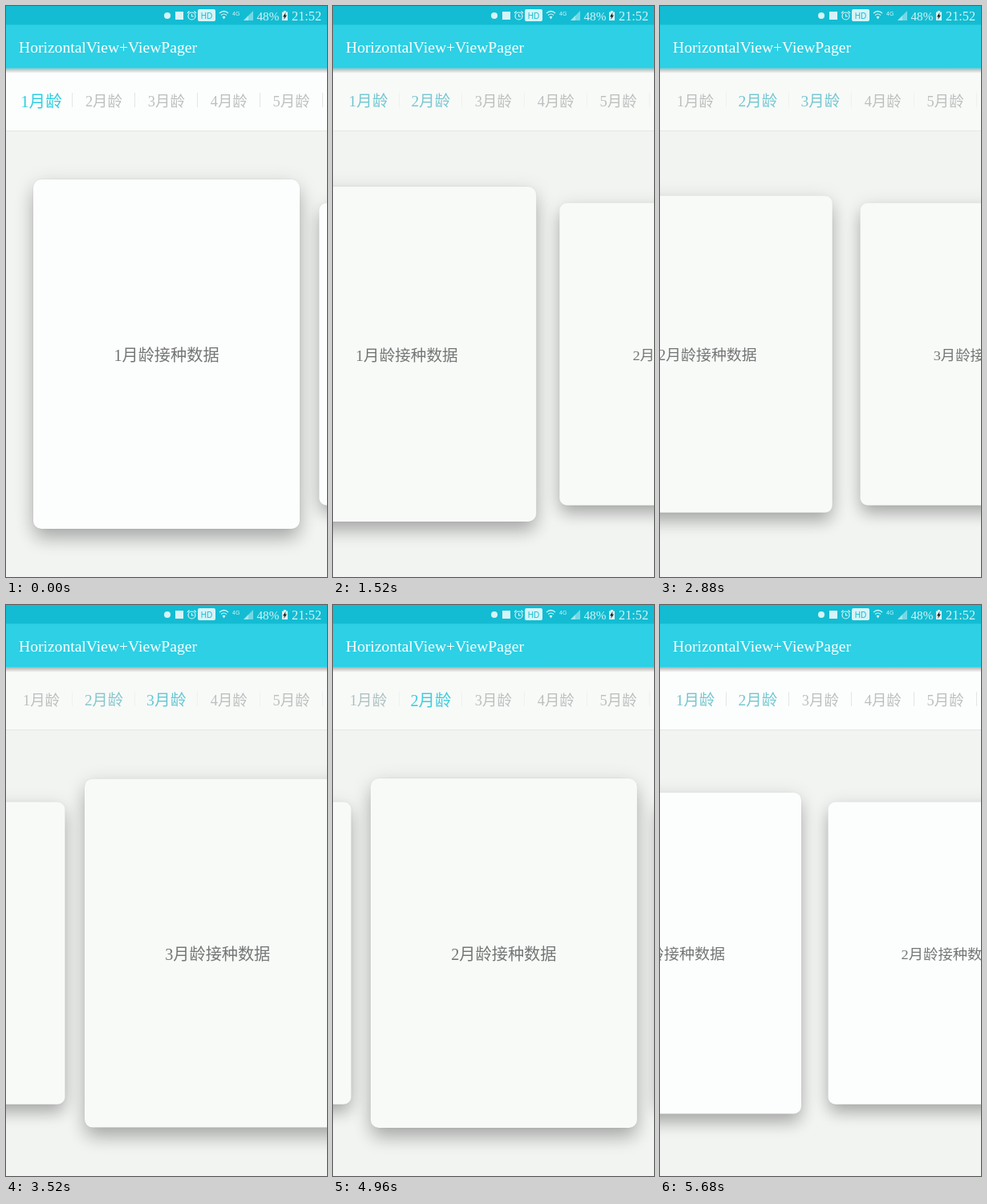
Recreate the animation shown at these times as an HTML page. Size 400 by 711 pixels, loop 5760 ms.

```html
<!DOCTYPE html>
<html lang="zh-CN">
<head>
<meta charset="utf-8">
<title>HorizontalView+ViewPager</title>
<style>
  html, body { margin: 0; width: 100%; height: 100%; overflow: hidden; background: #f2f4f2; }
  body, svg text { font-family: "Liberation Serif", "Noto Sans CJK SC", "Noto Sans CJK JP", "Noto Sans CJK", serif; font-weight: 300; }
  svg .sans { font-family: "Liberation Sans", sans-serif; font-weight: 400; }
  #stage { position: absolute; left: 0; top: 0; width: 400px; height: 711px; overflow: hidden; background: #f2f4f2; }
  .card {
    position: absolute; left: -166px; top: 216px; width: 332px; height: 435px;
    display: flex; align-items: center; justify-content: center;
    border-radius: 10px; background: var(--paper); color: #747675;
    font-size: 20.2px; white-space: nowrap;
    box-shadow: 0 14px 22px -2px rgba(0,0,0,.24), 0 4px 26px rgba(0,0,0,.12), 0 0 2px rgba(0,0,0,.08);
  }
  svg { position: absolute; left: 0; top: 0; }
  #strip { fill: var(--paper); }
  #dividers { stroke: var(--line); }
</style>
</head>
<body>
<div id="stage">
  <div id="cards"></div>
  <svg width="400" height="711" viewBox="0 0 400 711">
    <defs>
      <linearGradient id="shade" x2="0" y2="1">
        <stop offset="0" stop-color="#000" stop-opacity=".28"/>
        <stop offset="1" stop-color="#000" stop-opacity="0"/>
      </linearGradient>
    </defs>
    <rect id="strip" y="77" width="400" height="78"/>
    <rect y="155" width="400" height="1" fill="#e5e7e5"/>
    <g id="dividers"></g>
    <g id="tabs" text-anchor="middle"></g>

    <rect y="77.8" width="400" height="6" fill="url(#shade)"/>
    <rect width="400" height="77.8" fill="#2dd0e4"/>
    <rect width="400" height="23.3" fill="#13bcd2"/>
    <text x="16" y="58" font-size="19.6" fill="#fff">HorizontalView+ViewPager</text>

    <g fill="#d6f4f8">
      <circle cx="201" cy="12" r="4"/>
      <rect x="211" y="7" width="10" height="10"/>
      <g fill="none" stroke="#d6f4f8" stroke-width="1.2">
        <circle cx="231.5" cy="12.5" r="4.5"/>
        <path d="M231.5 10v3h2.500M226 9l2.500-2.500M237 9l-2.500-2.500"/>
        <path d="M266 9q5.500-5 11 0M268 11.500q3.500-3 7 0"/>
      </g>
      <path d="M269.500 13.500q2-1.500 4 0l-2 3z"/>
      <rect x="239" y="4" width="22" height="15" rx="2"/>
      <text class="sans" x="250" y="15.500" text-anchor="middle" font-size="10" fill="#13bcd2">HD</text>
      <text class="sans" x="282" y="11.500" font-size="7">4G</text>
      <path d="M308 6v12h-12z" opacity=".5"/>
      <path d="M302 12v6h-6z" opacity=".5"/>
      <text x="312.5" y="17.500" font-size="15.200">48%</text>
      <path d="M344 7.500h2v-1.500h3v1.500h2v10.500h-7z"/>
      <path d="M348.500 8l-3.500 5.500h2l-.8 3.500 3.800-5.500h-2z" fill="#222"/>
      <text x="356" y="17.500" font-size="16.300">21:52</text>
    </g>
  </svg>
</div>
<script>
const LOOP = 5760, STEP = 80, PAGES = 5;
const PAGE_GAP = 341, TAB_GAP = 77.9;
const MIN_X = 0.908, MIN_Y = 0.865;
const SHRINK = 780, GROW = 250, GROW_LEAD = 100, SETTLE = 280;
const GREY = [188, 191, 190], CYAN = [45, 206, 227];

const HOLDS = [[0, 960], [2080, 2240], [4800, 4880]];

// Times exclude the holds; drag speed is in pages per second.
const SWIPES = [
  { from: 0, to: 1, start: 32, release: 782, speed: 0.6 },
  { from: 1, to: 2, start: 1072, release: 1862, speed: 0.6 },
  { from: 2, to: 1, start: 2213, release: 3140, speed: 1 },
  { from: 1, to: 0, start: 3697, release: 4480, speed: 0.6 }
];

const clamp = u => Math.min(1, Math.max(0, u));
const mix = (a, b, u) => a + (b - a) * u;
const easeOut = u => 1 - (1 - u) ** 3;

function motionTime(t) {
  const held = HOLDS.reduce((sum, [a, b]) => sum + Math.min(b - a, Math.max(0, t - a)), 0);
  return t - held;
}

// Follows the finger until release, then settles on the next page.
function progress({ start, release, speed }, m) {
  const dragged = Math.max(0, Math.min(m, release) - start) / 1000 * speed;
  return mix(dragged, 1, easeOut(clamp((m - release) / SETTLE)));
}

// The page left behind shrinks while dragged; the next one grows around release.
function growthOf(page, swipe, m) {
  if (page === swipe.from) return 1 - clamp((m - swipe.start) / SHRINK) ** 3;
  if (page === swipe.to) return clamp((m - swipe.release + GROW_LEAD) / GROW);
  return 0;
}

function svgChild(parent, tag, attrs) {
  const node = document.createElementNS("http://www.w3.org/2000/svg", tag);
  for (const name in attrs) node.setAttribute(name, attrs[name]);
  return parent.appendChild(node);
}

const byId = id => document.getElementById(id);
const stage = byId("stage");
const cards = [], tabs = [];
for (let i = 0; i < PAGES; i++) {
  const label = `${i + 1}月龄`;
  const card = document.createElement("div");
  card.className = "card";
  card.textContent = label + "接种数据";
  cards.push(byId("cards").appendChild(card));

  const tab = svgChild(byId("tabs"), "text", { x: 44 + i * TAB_GAP });
  tab.textContent = label;
  tabs.push(tab);

  svgChild(byId("dividers"), "path", { d: `M${82.5 + i * 78} 108v18` });
}

function draw(t) {
  const m = motionTime(t);
  const swipe = SWIPES.findLast(s => m >= s.start) || SWIPES[0];
  const position = mix(swipe.from, swipe.to, progress(swipe, m));

  const bright = t < 80 || t >= 5600;
  stage.style.setProperty("--paper", bright ? "#fcfefd" : "#f8faf8");
  stage.style.setProperty("--line", bright ? "#e3e6e5" : "#eff1f0");

  cards.forEach((card, i) => {
    const grown = growthOf(i, swipe, m);
    const x = 200 + (i - position) * PAGE_GAP;
    card.style.transform =
      `translateX(${x}px) scale(${mix(MIN_X, 1, grown)}, ${mix(MIN_Y, 1, grown)})`;
  });

  tabs.forEach((tab, i) => {
    const near = clamp(1 - Math.abs(i - position));
    const active = 0.5 + 4 * (near - 0.5) ** 3;
    const size = mix(18.4, 20.6, active);
    tab.setAttribute("font-size", size);
    tab.setAttribute("y", 118 + size * 0.37);
    tab.setAttribute("fill", `rgb(${GREY.map((g, c) => Math.round(mix(g, CYAN[c], active)))})`);
  });
}

function tick() {
  draw(Math.floor(performance.now() % LOOP / STEP) * STEP);
  requestAnimationFrame(tick);
}
tick();
</script>
</body>
</html>
```
